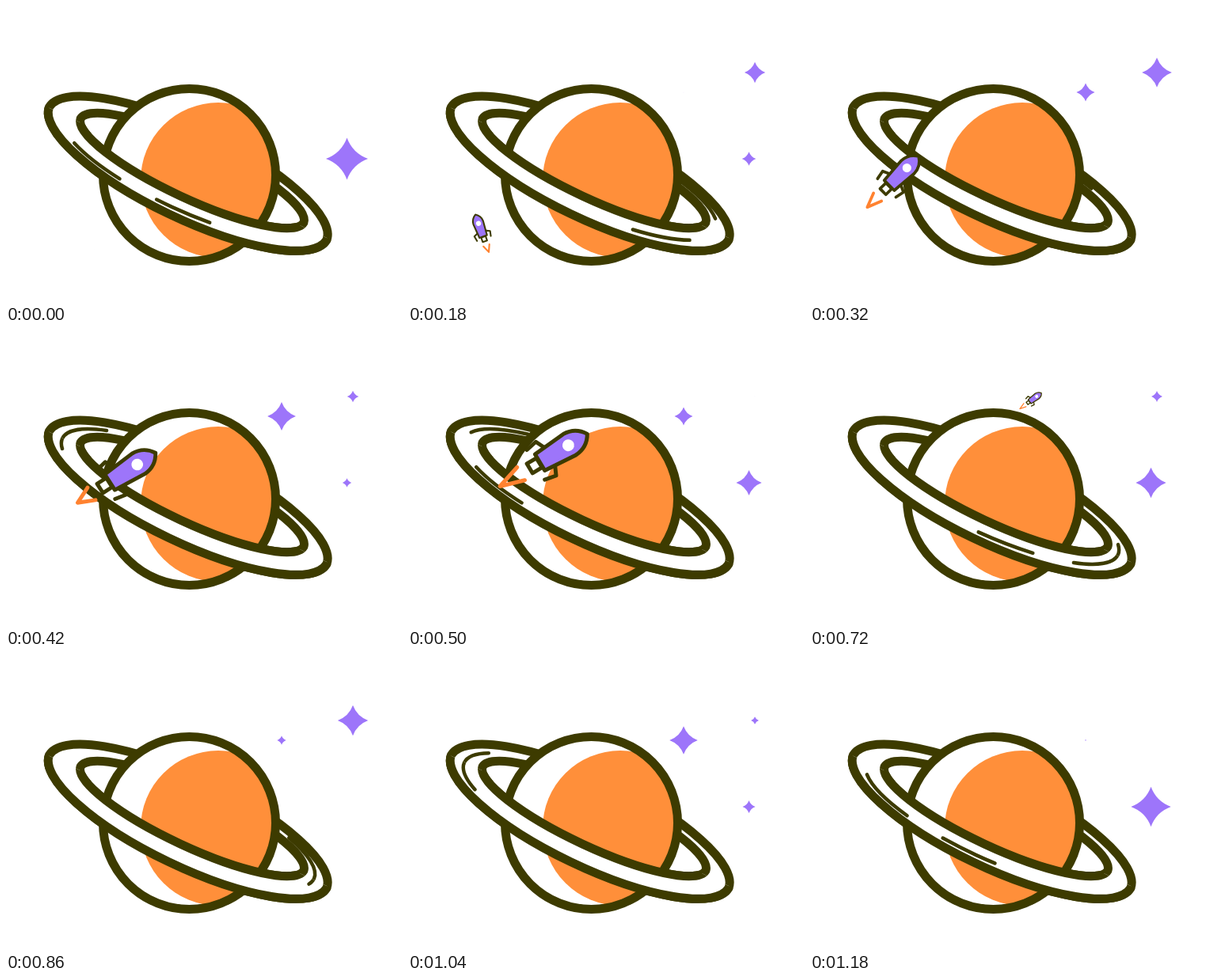
Recreate the animation shown at these times as an HTML page. Size 500 px wide and 374 px high, loop 1.2 s.

```html
<!DOCTYPE html>
<html lang="en">
<head>
<meta charset="utf-8">
<title>Ringed planet</title>
<style>
  html, body { margin: 0; width: 100%; height: 100%; overflow: hidden; background: #fff; }
  svg { display: block; width: 500px; height: 374px; }
  .line { stroke: #3d3b00; stroke-linecap: round; stroke-linejoin: round; }
</style>
</head>
<body>
<svg viewBox="0 0 500 374">
  <defs>
    <clipPath id="front"><path d="M-41 84L501 338V400H-41Z"/></clipPath>
    <clipPath id="globe"><circle cx="231.5" cy="213.5" r="109"/></clipPath>
    <path id="star" d="M0-1Q.27-.27 1 0Q.27 .27 0 1Q-.27 .27-1 0Q-.27-.27 0-1Z" fill="#9d75fa"/>
  </defs>

  <g id="ring" class="line" fill="none">
    <path fill="#fff" fill-rule="evenodd" stroke-width="11" d="
      M54.5 127.8A194.3 57.7 25.6 0 0 404.9 295.6A194.3 57.7 25.6 0 0 54.5 127.8Z
      M94.1 142.3A155.5 36 25 0 0 375.9 273.7A155.5 36 25 0 0 94.1 142.3Z"/>
    <path id="glints" stroke-width="4.5" pathLength="600" stroke-dasharray="58 42 58 442"
      d="M71.1 137.1A175 48 24.8 0 0 388.9 283.9A175 48 24.8 0 0 71.1 137.1"/>
  </g>

  <circle cx="231.5" cy="213.5" r="109" fill="#fff"/>
  <circle cx="268" cy="220" r="98" fill="#ff8f3a" clip-path="url(#globe)"/>
  <circle class="line" cx="231.5" cy="213.5" r="109" fill="none" stroke-width="11"/>
  <g clip-path="url(#front)"><use href="#ring"/></g>

  <g id="stars"><use href="#star"/><use href="#star"/><use href="#star"/></g>

  <g id="rocket" class="line" stroke-width="5" fill="none">
    <path id="flame" style="stroke:#ff8230"/>
    <path d="M12 27L25 33L22 48M-12 27L-25 33L-22 48"/>
    <path d="M-7 43H7V57H-7Z" fill="#fff"/>
    <path d="M0-28Q15-19 15.5-2L12 42H-12L-15.5-2Q-15-19 0-28Z" fill="#9d75fa"/>
    <circle r="7.5" fill="#fff" stroke="none"/>
  </g>
</svg>
<script>
const LOOP = 1200, PULSE = 600, GROWN = 430, LEAVING = 500, GONE = 800;
const $ = id => document.getElementById(id);
const rocket = $('rocket'), flame = $('flame'), glints = $('glints');

// x, y, full radius, time of the peak, rise and fall durations
const stars = [
  [430.5, 193, 27.5, 35, 303, 235],
  [438, 84, 19.8, 292, 285, 220],
  [348, 109, 18, 430, 270, 175],
];

// time, x, y, heading
const flight = [
  [0, 112, 308, -45],
  [180, 89, 275, -20],
  [320, 122, 205, 45],
  [500, 202, 146, 59],
  [620, 248, 112, 54],
  [GONE, 316, 62, 54],
];

const smooth = x => x <= 0 ? 0 : x >= 1 ? 1 : x * x * (3 - 2 * x);

function starSize(t, [, , size, peak, rise, fall]) {
  const after = (t - peak + PULSE) % PULSE;
  return size * Math.max(1 - smooth(after / fall), smooth(1 - (PULSE - after) / rise));
}

// Cubic through the flight points, with slopes taken from the neighbours
function flightAt(t) {
  const last = flight.length - 1;
  const i = flight.findIndex(k => k[0] > t) - 1;
  const a = flight[i], b = flight[i + 1], span = b[0] - a[0], u = (t - a[0]) / span;
  const slope = (n, j) => {
    const p = flight[Math.max(n - 1, 0)], q = flight[Math.min(n + 1, last)];
    return (q[j] - p[j]) / (q[0] - p[0]) * span;
  };
  return [1, 2, 3].map(j => a[j] + (b[j] - a[j]) * smooth(u)
    + slope(i, j) * u * (1 - u) ** 2 - slope(i + 1, j) * u * u * (1 - u));
}

function draw(now) {
  const t = now % LOOP, p = t % PULSE;
  glints.setAttribute('stroke-dashoffset', -(31.5 + p));

  stars.forEach((s, i) => $('stars').children[i]
    .setAttribute('transform', `translate(${s[0]} ${s[1]}) scale(${starSize(p, s)})`));

  const scale = Math.min(1, t / GROWN, (GONE - t) / (GONE - LEAVING));
  rocket.style.display = scale > 0 ? '' : 'none';
  if (scale > 0) {
    const [x, y, angle] = flightAt(t);
    const tip = 94.5 + 6.5 * Math.cos((t - 500) / 240 * 2 * Math.PI);
    rocket.setAttribute('transform', `translate(${x} ${y}) rotate(${angle}) scale(${scale})`);
    flame.setAttribute('d', `M-9.5 70L0 ${tip}L9.5 70`);
  }
}

const start = performance.now();
(function tick() {
  draw(performance.now() - start);
  requestAnimationFrame(tick);
})();
</script>
</body>
</html>
```
